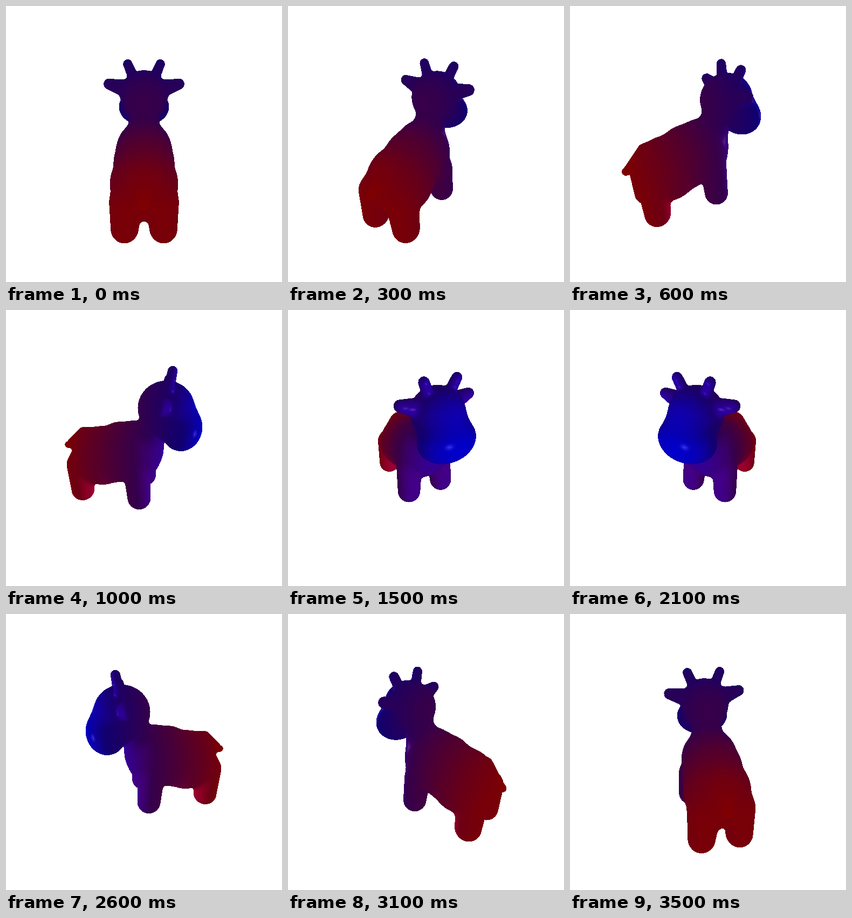
An HTML page with a canvas for the animation above (3600 ms loop, 512 px wide and 512 px high).

```html
<!DOCTYPE html>
<html lang="en">
<head>
<meta charset="utf-8">
<title>Turning cow</title>
<style>
  html, body { margin: 0; width: 100%; height: 100%; overflow: hidden; background: #fff; }
  canvas { display: block; }
</style>
</head>
<body>
<canvas id="stage" width="512" height="512"></canvas>
<script>
const SIZE = 512, HALF = SIZE / 2;
const FOCAL = HALF * Math.sqrt(3);          // 60 degree field of view
const DIST = 3, TILT = Math.PI / 6;
const STEP_MS = 100, STEPS = 36;
const Z_FRONT = -0.69, Z_BACK = 1.06;

// --- Shape: a smooth union of ellipsoids and tapered limbs, mirrored in x ---
const ellipsoid = (cx, cy, cz, rx, ry, rz) => (x, y, z) => {
  const a = (x - cx) / rx, b = (y - cy) / ry, c = (z - cz) / rz;
  const k = Math.hypot(a, b, c);
  return k * (k - 1) / (Math.hypot(a / rx, b / ry, c / rz) + 1e-9);
};

const limb = (ax, ay, az, ra, bx, by, bz, rb) => {
  const dx = bx - ax, dy = by - ay, dz = bz - az;
  const len2 = dx * dx + dy * dy + dz * dz;
  return (x, y, z) => {
    const px = x - ax, py = y - ay, pz = z - az;
    const t = Math.min(1, Math.max(0, (px * dx + py * dy + pz * dz) / len2));
    return Math.hypot(px - dx * t, py - dy * t, pz - dz * t) - ra - (rb - ra) * t;
  };
};

const smoothMin = (a, b, k) => {
  const h = Math.max(0, k - Math.abs(a - b));
  return Math.min(a, b) - h * h / (4 * k);
};

const SKIN = .012;                          // extra thickness over every part
const chest = ellipsoid(0, -.05, .1, .33, .38, .32);
const trunk = ellipsoid(0, -.09, .3, .34, .385, .34);
const rump = ellipsoid(0, -.17, .56, .355, .38, .38);
const tail = limb(0, .05, .77, .15, 0, -.05, 1.02, .033);
const foreLeg = limb(.22, -.25, .05, .15, .25, -.6, .02, .138);
const hindLeg = limb(.18, -.22, .795, .16, .21, -.6, .8, .14);
const neck = limb(0, 0, -.02, .2, 0, .42, -.13, .16);
const skull = ellipsoid(0, .54, -.25, .28, .29, .305);
const muzzle = ellipsoid(0, .32, -.44, .325, .24, .225);
const ear = limb(.22, .64, -.22, .095, .415, .695, -.22, .052);
const horn = limb(.13, .77, -.27, .05, .19, .91, -.29, .043);

function cow(x, y, z) {
  x = Math.abs(x);
  let body = smoothMin(chest(x, y, z), rump(x, y, z), .08);
  body = smoothMin(body, trunk(x, y, z), .06);
  body = smoothMin(body, tail(x, y, z), .06);
  body = smoothMin(body, foreLeg(x, y, z), .06);
  body = smoothMin(body, hindLeg(x, y, z), .06);
  body = smoothMin(body, neck(x, y, z), .06);
  let head = smoothMin(skull(x, y, z), muzzle(x, y, z), .1);
  head = smoothMin(head, ear(x, y, z), .04);
  head = smoothMin(head, horn(x, y, z), .03);
  return smoothMin(body, head, .03) - SKIN;
}

function normalAt(x, y, z) {
  const e = .004;
  const n = [
    cow(x + e, y, z) - cow(x - e, y, z),
    cow(x, y + e, z) - cow(x, y - e, z),
    cow(x, y, z + e) - cow(x, y, z - e)
  ];
  const len = Math.hypot(...n) || 1;
  return n.map(v => v / len);
}

// --- Mesh: one vertex per cell on the surface, one quad per crossed edge ---
const CELL = .02, ORIGIN = [-.61, -.82, -.76], COUNT = [62, 92, 95];
const STRIDE = [COUNT[1] * COUNT[2], COUNT[2], 1];
const verts = [], tris = [];

function makeVertex(id) {
  const i = Math.floor(id / STRIDE[0]), j = Math.floor(id / STRIDE[1]) % COUNT[1], k = id % COUNT[2];
  let p = [i, j, k].map((v, a) => ORIGIN[a] + (v + .5) * CELL);
  for (let pass = 0; pass < 4; pass++) {
    const d = cow(...p), n = normalAt(...p);
    p = p.map((v, a) => v - n[a] * d);
  }
  const n = normalAt(...p);
  const toLight = [-p[0], -p[1], -3 - p[2]];
  const len = Math.hypot(...toLight);
  const l = toLight.map(v => v / len);
  const facing = n[0] * l[0] + n[1] * l[1] + n[2] * l[2];
  const glow = 255 * (.5 + .3 * Math.max(0, facing));
  const back = Math.min(1, Math.max(0, (p[2] - Z_FRONT) / (Z_BACK - Z_FRONT)));
  verts.push({
    p, lit: facing > 0,
    mirror: n.map((v, a) => 2 * facing * v - l[a]),
    red: glow * back, blue: glow * (1 - back),
    sx: 0, sy: 0, w: 0, spec: 0
  });
  return verts.length - 1;
}

function buildMesh() {
  const field = new Float32Array(COUNT[0] * STRIDE[0]);
  const each = (lo, fn) => {
    for (let i = lo; i < COUNT[0] - lo; i++)
      for (let j = lo; j < COUNT[1] - lo; j++)
        for (let k = lo; k < COUNT[2] - lo; k++) fn(i * STRIDE[0] + j * STRIDE[1] + k, i, j, k);
  };
  each(0, (id, i, j, k) => {
    field[id] = cow(ORIGIN[0] + i * CELL, ORIGIN[1] + j * CELL, ORIGIN[2] + k * CELL);
  });
  const known = new Map();
  const vertex = id => {
    if (!known.has(id)) known.set(id, makeVertex(id));
    return verts[known.get(id)];
  };
  each(1, id => {
    for (let a = 0; a < 3; a++) {
      if (field[id] < 0 === field[id + STRIDE[a]] < 0) continue;
      const b = STRIDE[(a + 1) % 3], c = STRIDE[(a + 2) % 3];
      const q = [id, id - b, id - b - c, id - c].map(vertex);
      tris.push([q[0], q[1], q[2]], [q[0], q[2], q[3]]);
    }
  });
}

// --- Rendering with a depth buffer ---
const ctx = document.getElementById('stage').getContext('2d');
const image = ctx.createImageData(SIZE, SIZE), pixels = image.data;
const depth = new Float32Array(SIZE * SIZE);

function project(angle) {
  const ca = Math.cos(angle), sa = Math.sin(angle);
  const ct = Math.cos(TILT), st = Math.sin(TILT);
  const eye = [DIST * sa * ct, DIST * st, DIST * ca * ct];
  for (const v of verts) {
    const [x, y, z] = v.p;
    const near = x * sa + z * ca;
    v.w = 1 / (DIST - y * st - near * ct);
    v.sx = HALF + FOCAL * (x * ca - z * sa) * v.w;
    v.sy = HALF - FOCAL * (y * ct - near * st) * v.w;
    v.spec = 0;
    if (v.lit) {
      const ex = eye[0] - x, ey = eye[1] - y, ez = eye[2] - z, m = v.mirror;
      const dot = (m[0] * ex + m[1] * ey + m[2] * ez) / Math.hypot(ex, ey, ez);
      v.spec = 51 * Math.max(0, dot) ** 64;
    }
  }
}

function fillTriangle([a, b, c]) {
  const area = (b.sx - a.sx) * (c.sy - a.sy) - (b.sy - a.sy) * (c.sx - a.sx);
  if (!area) return;
  const x0 = Math.ceil(Math.min(a.sx, b.sx, c.sx) - .5), x1 = Math.max(a.sx, b.sx, c.sx) - .5;
  const y0 = Math.ceil(Math.min(a.sy, b.sy, c.sy) - .5), y1 = Math.max(a.sy, b.sy, c.sy) - .5;
  for (let y = y0; y <= y1; y++) {
    for (let x = x0; x <= x1; x++) {
      const px = x + .5, py = y + .5;
      const u = ((b.sx - px) * (c.sy - py) - (b.sy - py) * (c.sx - px)) / area;
      const v = ((c.sx - px) * (a.sy - py) - (c.sy - py) * (a.sx - px)) / area;
      const t = 1 - u - v;
      if (u < -1e-6 || v < -1e-6 || t < -1e-6) continue;
      const w = u * a.w + v * b.w + t * c.w, at = y * SIZE + x;
      if (w <= depth[at]) continue;
      depth[at] = w;
      const spec = u * a.spec + v * b.spec + t * c.spec;
      pixels[at * 4] = u * a.red + v * b.red + t * c.red + spec;
      pixels[at * 4 + 1] = spec;
      pixels[at * 4 + 2] = u * a.blue + v * b.blue + t * c.blue + spec;
    }
  }
}

function draw(step) {
  pixels.fill(255);
  depth.fill(0);
  project(step / STEPS * 2 * Math.PI);
  tris.forEach(fillTriangle);
  ctx.putImageData(image, 0, 0);
}

buildMesh();
let shown = -1;
const start = performance.now();
function tick() {
  const step = Math.floor((performance.now() - start) / STEP_MS) % STEPS;
  if (step !== shown) draw(shown = step);
  requestAnimationFrame(tick);
}
tick();
</script>
</body>
</html>
```
